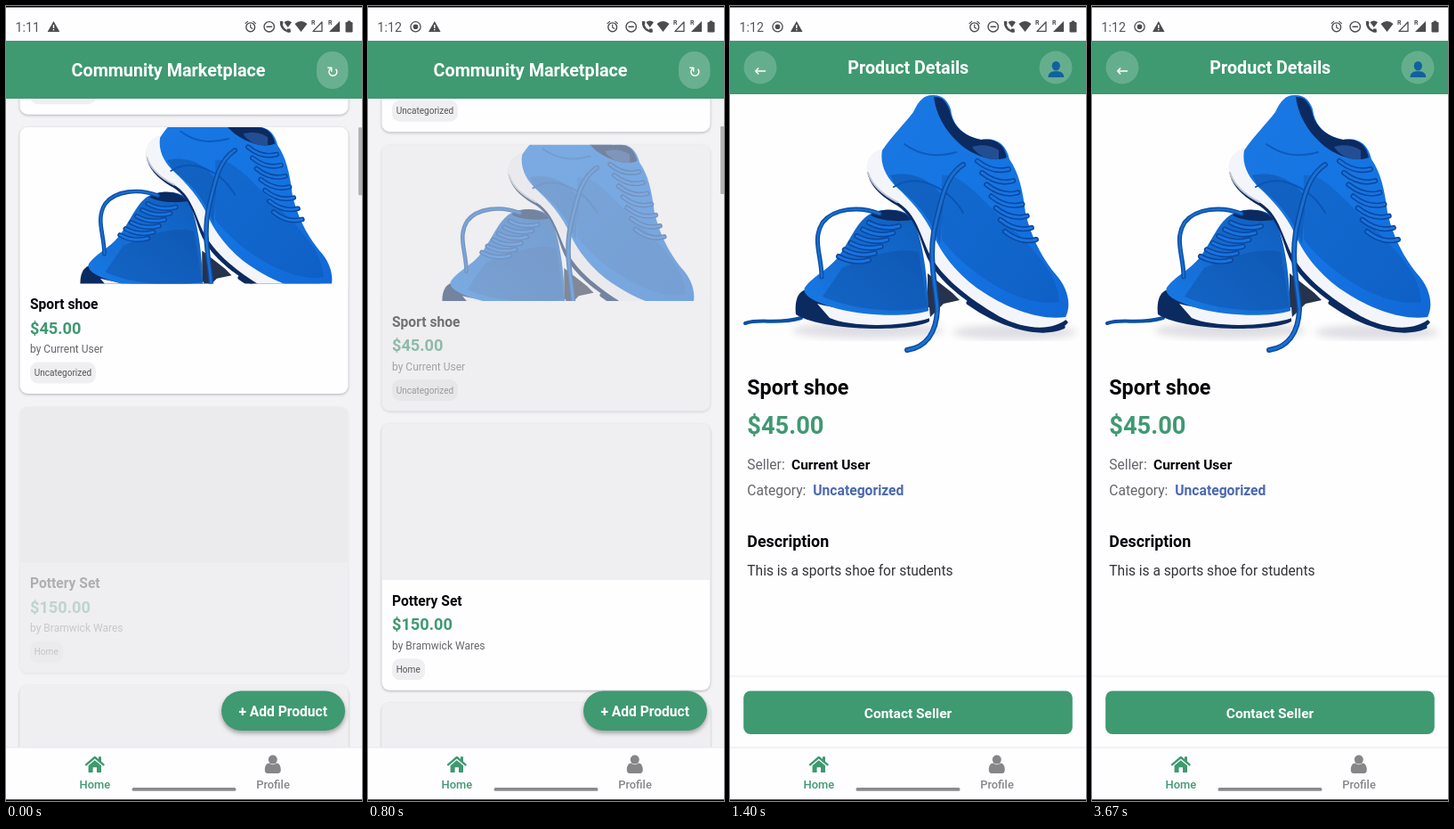
These frames come from a looping animation (400x892 px, 3740 ms). An HTML page:

```html
<!DOCTYPE html>
<html lang="en">
<head>
<meta charset="utf-8">
<title>Community Marketplace</title>
<style>
  html, body { margin: 0; width: 100%; height: 100%; overflow: hidden; background: #fefdff; }
  svg { display: block; width: 100vw; height: 100vh; }
  text { font-family: Roboto, "DejaVu Sans", sans-serif; white-space: pre; }
  .shadow { filter: drop-shadow(0 1.5px 1.5px rgba(0, 0, 0, .27)); }
</style>
</head>
<body>
<svg id="stage" viewBox="0 0 400 892"></svg>
<script>
const LOOP = 3740, STEP = 200 / 3;
const GREEN = '#3f9971', PAPER = '#fefdff', GREY = '#efeef1', NAVY = '#0b2a60', WHITE = '#f4f5fa';

const rect = (x, y, w, h, fill, rx = 0, extra = '') =>
  `<rect x="${x}" y="${y}" width="${w}" height="${h}" rx="${rx}" fill="${fill}" ${extra}/>`;
const text = (s, x, y, size, fill, weight = 400, anchor = 'start') =>
  `<text x="${x}" y="${y}" font-size="${size}" fill="${fill}" font-weight="${weight}" text-anchor="${anchor}">${s}</text>`;
const fill = (d, color, opacity = 1) => `<path d="${d}" fill="${color}" opacity="${opacity}"/>`;
const line = (d, color, width = 1.5) =>
  `<path d="${d}" fill="none" stroke="${color}" stroke-width="${width}" stroke-linecap="round" stroke-linejoin="round"/>`;
const disc = (x, y, r, color) => `<circle cx="${x}" cy="${y}" r="${r}" fill="${color}"/>`;
const ring = (x, y, r, color, width = 1.4) =>
  `<circle cx="${x}" cy="${y}" r="${r}" fill="none" stroke="${color}" stroke-width="${width}"/>`;

// Parallel lace strokes from one point to another
function laces(x0, y0, x1, y1, dx, dy, count) {
  let d = '';
  for (let i = 0; i < count; i++) {
    const k = i / (count - 1), x = x0 + (x1 - x0) * k, y = y0 + (y1 - y0) * k;
    d += `M${x},${y}q${dx / 2},${dy + 5} ${dx},${dy}`;
  }
  return line(d, '#0a459a', 6) + line(d, '#1873e0', 3);
}

function shoes() {
  const loop = 'M168,233C145,224 116,227 104,243C92,262 103,280 103,304';
  const dangling = 'M262,178C243,190 238,214 231,244C222,280 231,312 233,340C232,368 219,383 199,386';
  const tail = 'M17,356C35,350 52,358 80,350';
  return rect(0, 99, 400, 292, '#fefefe') +
    `<g fill="#99a" opacity=".32" filter="url(#soft)">
      <ellipse cx="155" cy="364" rx="85" ry="9"/><ellipse cx="320" cy="366" rx="70" ry="8"/>
    </g>` +
    fill('M222,300L250,322L258,330L240,334L222,352Z', '#26334d') +
    // left shoe
    line(tail, '#0b4fa6', 4) +
    fill('M74,346C72,328 78,316 92,318L224,338L224,354C198,367 102,364 74,346Z', NAVY) +
    fill('M98,334C132,343 180,345 224,338L225,350C190,361 134,360 112,350Z', WHITE) +
    fill('M151,238C165,225 195,226 205,238C216,260 222,300 223,342C196,350 150,347 122,340C100,334 80,326 84,316C94,302 112,296 124,278C135,262 141,247 151,238Z', 'url(#blueLeft)') +
    fill('M126,294C156,280 190,270 212,276L222,338C192,345 140,342 104,326Z', '#0d4a9c', .4) +
    fill('M158,235C166,227 193,225 204,240C192,242 172,242 158,235Z', NAVY) +
    laces(156, 243, 122, 281, 34, 4, 6) +
    // right shoe
    fill('M168,164C156,168 152,178 155,190C160,206 174,216 188,224C208,238 212,256 219,276C230,308 268,334 302,353C332,368 366,372 380,355L330,300L220,190Z', NAVY) +
    fill('M170,160C156,165 152,175 154,187C160,203 174,213 188,220C208,232 213,254 222,274C236,304 268,328 302,348C330,363 362,366 380,350L300,270Z', WHITE) +
    line('M155,187C160,203 174,213 188,220', '#c0c4d2', 2) +
    line('M268,333C300,356 345,372 374,360', NAVY, 5) +
    fill('M171,162C182,146 196,132 206,119C212,106 218,100 227,100C238,99 245,106 248,116C250,134 262,146 282,150C298,147 310,154 314,172C324,186 329,206 332,232C339,262 352,284 365,300C380,316 384,336 377,349C348,353 314,340 286,322C260,306 240,282 230,260C220,236 202,217 188,204C176,193 168,178 171,162Z', 'url(#blueRight)') +
    fill('M238,190C262,186 288,224 330,262C350,284 368,304 370,332C330,340 266,300 238,262Z', '#0d4a9c', .3) +
    fill('M180,190C206,184 226,196 240,214L236,268C224,232 204,216 186,202Z', '#0d4a9c', .45) +
    fill('M229,102C238,101 244,108 247,118C250,134 262,146 282,150C299,148 308,155 311,170C296,176 276,168 262,158C246,145 232,126 229,102Z', NAVY) +
    fill('M272,158C282,155 294,156 302,162L302,172C290,173 278,168 272,158Z', '#234e94') +
    line('M184,203C210,186 246,204 262,232', '#0b55b4', 2) +
    line('M196,155C214,168 232,170 254,164', '#0d5abe', 2) +
    laces(278, 174, 309, 253, 35, 9, 7) +
    line(loop, '#0b4fa6', 5) + line(loop, '#1a70d4', 2) +
    line(dangling, '#0b4a9e', 6) + line(dangling, '#1a70d4', 3);
}

function card(index, name, price, seller, tag, tagWidth) {
  const image = index === 1
    ? `<g clip-path="url(#photo)"><use href="#shoes" transform="translate(15.5 -138.3) scale(.9225)"/></g>`
    : `<g clip-path="url(#photo)">${rect(15.5, 0, 369, 175.5, GREY)}</g>`;
  return `<g transform="translate(0 ${155.5 + 313.3 * (index - 1)})">
    ${rect(15.5, 0, 369, 299, '#000', 9, `id="under${index}" opacity="0"`)}
    <g id="card${index}">
      ${rect(15.5, 0, 369, 299, PAPER, 9, 'class="shadow"')}${image}
      ${text(name, 27, 204, 15.6, '#050505', 700)}
      ${text(price, 27, 231.5, 18.2, GREEN, 700)}
      ${text('by ' + seller, 27, 253, 12, '#666')}
      ${rect(27, 263.5, tagWidth, 24, GREY, 9)}
      ${text(tag, 31.7, 279.2, 10.05, '#555')}
    </g></g>`;
}

function listPage() {
  return rect(0, 39, 400, 793, '#f3f2f5') +
    `<g id="scroll">
      ${card(0, 'Sport shoe', '$45.00', 'Current User', 'Uncategorized', 74)}
      ${card(1, 'Sport shoe', '$45.00', 'Current User', 'Uncategorized', 74)}
      ${card(2, 'Pottery Set', '$150.00', 'Bramwick Wares', 'Home', 37)}
      ${card(3, '', '', '', '', 0)}
    </g>` +
    `<g id="bar">${rect(396, 135, 5, 76, '#b3b1b4', 1)}</g>` +
    rect(0, 20, 400, 84, GREEN) +
    text('Community Marketplace', 182.5, 79, 19.75, '#fff', 700, 'middle') +
    rect(349, 51, 35.5, 42, '#fff', 17.7, 'opacity=".22"') +
    text('↻', 367, 79.5, 17, '#fff', 400, 'middle') +
    rect(242, 768.5, 139, 44.5, GREEN, 22.2, 'style="filter:drop-shadow(0 3px 2.5px rgba(0,0,0,.32))"') +
    text('+ Add Product', 311.2, 797, 15.6, '#fff', 700, 'middle');
}

function detailPage() {
  return rect(0, 39, 400, 793, PAPER) +
    '<use href="#shoes"/>' +
    rect(0, 39, 400, 60, GREEN) +
    text('Product Details', 200.3, 76, 19.7, '#fff', 700, 'middle') +
    `<g opacity=".2">${disc(34, 69, 18.5, '#fff')}${disc(366, 69, 18.5, '#fff')}</g>` +
    line('M28.7,73H39.5M31.7,70L28.7,73L31.7,76', '#fff', 1.5) +
    '<ellipse cx="366.3" cy="67.2" rx="4.6" ry="5.3" fill="#12609f"/>' +
    fill('M357.5,80C357.5,75 361,73.3 366.3,73.3C371.6,73.3 375.2,75 375.2,80Z', '#12609f') +
    text('Sport shoe', 19.3, 435.7, 23.3, '#050505', 700) +
    text('$45.00', 19.3, 480, 27.25, GREEN, 700) +
    text('Seller:', 19.3, 520, 15.57, '#666') +
    text('Current User', 69, 520, 15.5, '#050505', 700) +
    text('Category:', 19.3, 549, 15.57, '#666') +
    text('Uncategorized', 93.3, 549, 15.65, '#4a69ae', 700) +
    text('Description', 19.3, 607, 17.85, '#050505', 700) +
    text('This is a sports shoe for students', 19.3, 639, 15.57, '#333') +
    rect(0, 751.5, 400, 1, '#eceaee') +
    rect(15.2, 768.5, 369.6, 48.6, GREEN, 7.8) +
    text('Contact Seller', 200, 798.5, 15.5, '#fff', 700, 'middle');
}

function statusBar() {
  const ink = '#4c4b4e';
  const signal = (x, full) =>
    (full ? fill(`M${x + 12},17V29H${x}Z`, ink) : line(`M${x + 11},18V28.4H${x + 1}Z`, ink, 1.3)) +
    text('R', x - 1, 21, 7, ink, 700);
  return rect(0, 0, 400, 39, PAPER) + rect(0, 0, 400, 1.5, '#000') +
    `<text id="clock" x="10.5" y="28.5" font-size="14.2" fill="#555"></text>` +
    `<g id="record">${ring(53.5, 23.3, 5.6, ink, 1.3)}${disc(53.5, 23.3, 2.8, ink)}</g>` +
    `<g id="alert">${fill('M53.5,17L60.3,29H46.7Z', ink)}${rect(52.8, 21, 1.4, 4, PAPER)}${rect(52.8, 26, 1.4, 1.4, PAPER)}</g>` +
    ring(274.7, 23.8, 4.9, ink) + line('M274.7,21V24L276.7,25.3M269,19.6L271.6,17.4M280.4,19.6L277.8,17.4', ink, 1.2) +
    ring(295.7, 23.3, 5.7, ink) + line('M293,23.3H298.4', ink, 1.4) +
    line('M309.2,18.2C308.6,23.5 313,28.4 318.5,28.2', ink, 2.5) +
    fill('M307.8,17.3H311.3V20.8H308.2ZM316,25.6H319.6V29.4H316Z', ink) +
    fill('M312.5,18.3Q316.8,14.8 321,18.3L316.8,24Z', ink) +
    fill('M324.5,20Q331.5,14 338.5,20L331.5,29Z', ink) +
    signal(344, false) + signal(363, true) +
    rect(381.5, 18, 8, 11.5, ink, 1.2) + rect(383.8, 16.6, 3.4, 2, ink);
}

function navBar() {
  return rect(0, 832, 400, 60, PAPER) + rect(0, 831.5, 400, 1, '#e9e7eb') +
    line('M90,851.3L99.8,843L109.6,851.3', GREEN, 2.3) +
    fill('M104,842.3H107V849L104,846.5ZM92.6,852.2L99.8,846.2L107,852.2V860H102V854.2H97.6V860H92.6Z', GREEN) +
    text('Home', 99.8, 878, 12.9, GREEN, 500, 'middle') +
    disc(299.8, 845.6, 5, '#868587') +
    fill('M290.8,857C290.8,852 293,849.8 295.5,849.6Q299.8,853 304.1,849.6C306.6,849.8 308.8,852 308.8,857Q308.8,861 305.5,861H294Q290.8,861 290.8,857Z', '#868587') +
    text('Profile', 300, 878, 12.9, '#868587', 500, 'middle') +
    rect(141.5, 877, 117, 3.8, '#8b8a8d', 1.9) + rect(0, 890.3, 400, 1.7, '#000');
}

const $ = id => document.getElementById(id);
$('stage').innerHTML = `<defs>
  <filter id="soft"><feGaussianBlur stdDeviation="4"/></filter>
  <linearGradient id="blueRight" x1="0" y1="0" x2="1" y2="1">
    <stop offset="0" stop-color="#1a78e2"/><stop offset=".55" stop-color="#1474e2"/><stop offset="1" stop-color="#1068d6"/>
  </linearGradient>
  <linearGradient id="blueLeft" x1="1" y1="0" x2="0" y2="1">
    <stop offset="0" stop-color="#0f5cba"/><stop offset="1" stop-color="#187ae6"/>
  </linearGradient>
  <clipPath id="body"><rect y="39" width="400" height="793"/></clipPath>
  <clipPath id="photo"><path d="M15.5,175.5V9a9 9 0 0 1 9,-9H375.5a9 9 0 0 1 9,9V175.5Z"/></clipPath>
  <clipPath id="frame"><rect y="99" width="400" height="292"/></clipPath>
  <g id="shoes" clip-path="url(#frame)">${shoes()}</g>
</defs>
<g clip-path="url(#body)"><g id="list">${listPage()}</g><g id="detail">${detailPage()}</g></g>
${statusBar()}${navBar()}`;

// Linear interpolation through [time, value] keys
function track(keys, t) {
  if (t <= keys[0][0]) return keys[0][1];
  for (let i = 1; i < keys.length; i++) {
    const [t0, a] = keys[i - 1], [t1, b] = keys[i];
    if (t < t1) return a + (b - a) * (t - t0) / (t1 - t0);
  }
  return keys[keys.length - 1][1];
}

const SCROLL = [[0, -19.5], [67, -11], [133, -5], [200, -1.5], [266, 0]];
const POTTERY = [[0, .25], [67, .45], [133, .68], [200, .9], [266, 1]];
const SHOE = [[600, 1], [667, .55], [733, .27], [800, .5], [867, .85], [933, 1]];
const ZOOM = [[800, 0], [867, .03], [933, .635], [1000, .94], [1067, .99], [1133, 1]];

function press(index, opacity) {
  $('card' + index).setAttribute('opacity', opacity);
  $('under' + index).setAttribute('opacity', opacity < 1 ? .16 * opacity : 0);
}

const zoom = (id, s) =>
  $(id).setAttribute('transform', `translate(200 414) scale(${s}) translate(-200 -414)`);
const show = (id, on) => $(id).setAttribute('visibility', on ? 'visible' : 'hidden');

function draw(time) {
  const t = Math.floor((time % LOOP + 5) / STEP) * STEP;
  const y = track(SCROLL, t), p = track(ZOOM, t), recording = t > 390;
  $('scroll').setAttribute('transform', `translate(0 ${y})`);
  $('bar').setAttribute('transform', `translate(0 ${-y / 16})`);
  press(1, track(SHOE, t));
  press(2, track(POTTERY, t));
  zoom('list', 1 + .15 * p);
  zoom('detail', .85 + .15 * p);
  show('list', t < 1100);
  show('detail', t > 960);
  $('clock').textContent = t < 100 ? '1:11' : '1:12';
  show('record', recording);
  $('alert').setAttribute('transform', `translate(${recording ? 21.3 : 0} 0)`);
}

const start = performance.now();
function tick() {
  draw(performance.now() - start);
  requestAnimationFrame(tick);
}
draw(0);
requestAnimationFrame(tick);
</script>
</body>
</html>
```
